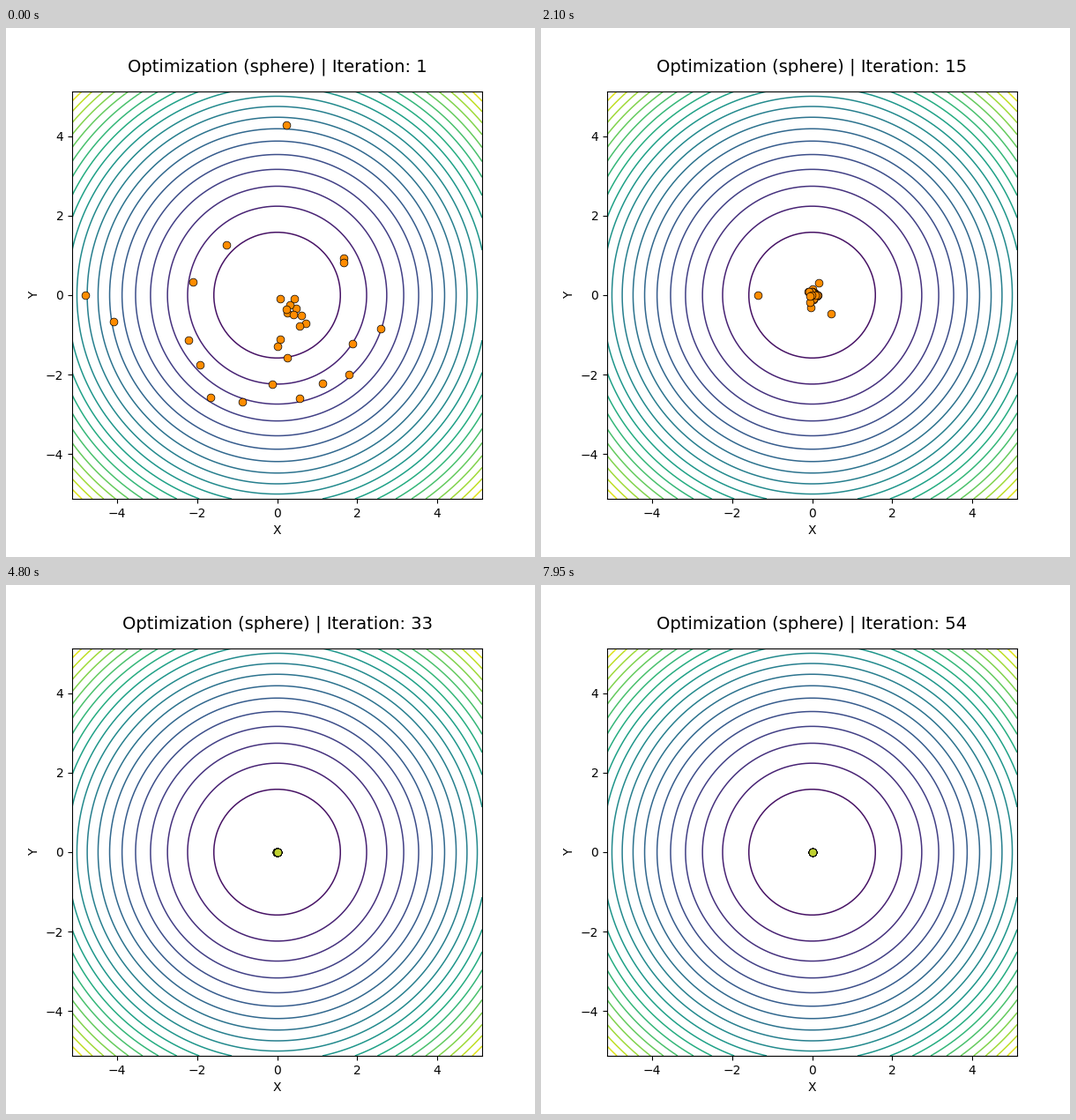
A matplotlib script for the animation above (8 s loop, 600x600 px).

```python
import matplotlib.pyplot as plt
import numpy as np
from matplotlib.animation import FuncAnimation

LIMIT = 5.12
COUNT = 30
INTERVAL = 50          # ms
TICKS_PER_STEP = 3     # one iteration lasts 150 ms
FRAMES = 160
ORANGE, LIME = "#ff8c00", "#bfd130"
rng = np.random.default_rng(4)


def blob(n, sigma, center=(0, 0)):
    return rng.normal(center, sigma, (n, 2))


def arc(n, first, last, radius):
    angle = np.radians(np.linspace(first, last, n))
    r = radius + rng.normal(0, 0.25, n)
    return np.column_stack([r * np.cos(angle), r * np.sin(angle)])


def scattered_swarm():
    strays = [(.23, 4.28), (-4.79, 0), (-4.08, -.67), (-1.27, 1.26), (-2.1, .33)]
    return np.vstack([
        strays,
        arc(10, 207, 342, 2.65),
        blob(2, .12, (1.63, .75)),
        blob(3, .15, (.3, -1.45)),
        blob(10, .22, (.4, -.3))])


def shrunk_swarm(sigma, strays):
    return np.vstack([strays, blob(COUNT - len(strays), sigma)])


# swarm positions at selected iterations
POSES = [
    (1, scattered_swarm()),
    (9, shrunk_swarm(.26, [(1.2, .09), (.01, .91)])),
    (15, shrunk_swarm(.07, [(-1.35, 0), (.48, -.46), (.17, .31), (-.03, -.31)])),
    (27, blob(COUNT, .012)),
    (37, blob(COUNT, .004)),
    (54, np.zeros((COUNT, 2))),
]


def swarm(iteration):
    for (t0, a), (t1, b) in zip(POSES, POSES[1:]):
        if iteration <= t1:
            break
    u = (iteration - t0) / (t1 - t0)
    ease = (1 - np.exp(-2 * u)) / (1 - np.exp(-2))
    pos = a + (b - a) * ease
    noise = np.random.default_rng(iteration).normal(0, 1, pos.shape)
    reach = np.linalg.norm(pos, axis=1, keepdims=True)
    return pos + noise * reach * u * (1 - u)


fig, ax = plt.subplots(figsize=(6, 6), dpi=100)
axis = np.linspace(-LIMIT, LIMIT, 100)
X, Y = np.meshgrid(axis, axis)
ax.contour(X, Y, X**2 + Y**2, levels=20, cmap="viridis", linewidths=1.1)
dots = ax.scatter(*POSES[0][1].T, s=40, c=ORANGE, edgecolors="black",
                  linewidths=0.5, zorder=3)
ax.set(xlim=(-LIMIT, LIMIT), ylim=(-LIMIT, LIMIT), xlabel="X", ylabel="Y")
title = ax.set_title("", fontsize=14, pad=16.5)


def update(frame):
    iteration = frame // TICKS_PER_STEP + 1
    dots.set_offsets(swarm(iteration))
    dots.set_facecolor(ORANGE if iteration < 20 else LIME)
    title.set_text(f"Optimization (sphere) | Iteration: {iteration}")
    return dots, title


anim = FuncAnimation(fig, update, frames=FRAMES, interval=INTERVAL,
                     repeat=True, repeat_delay=0)
plt.show()
```
